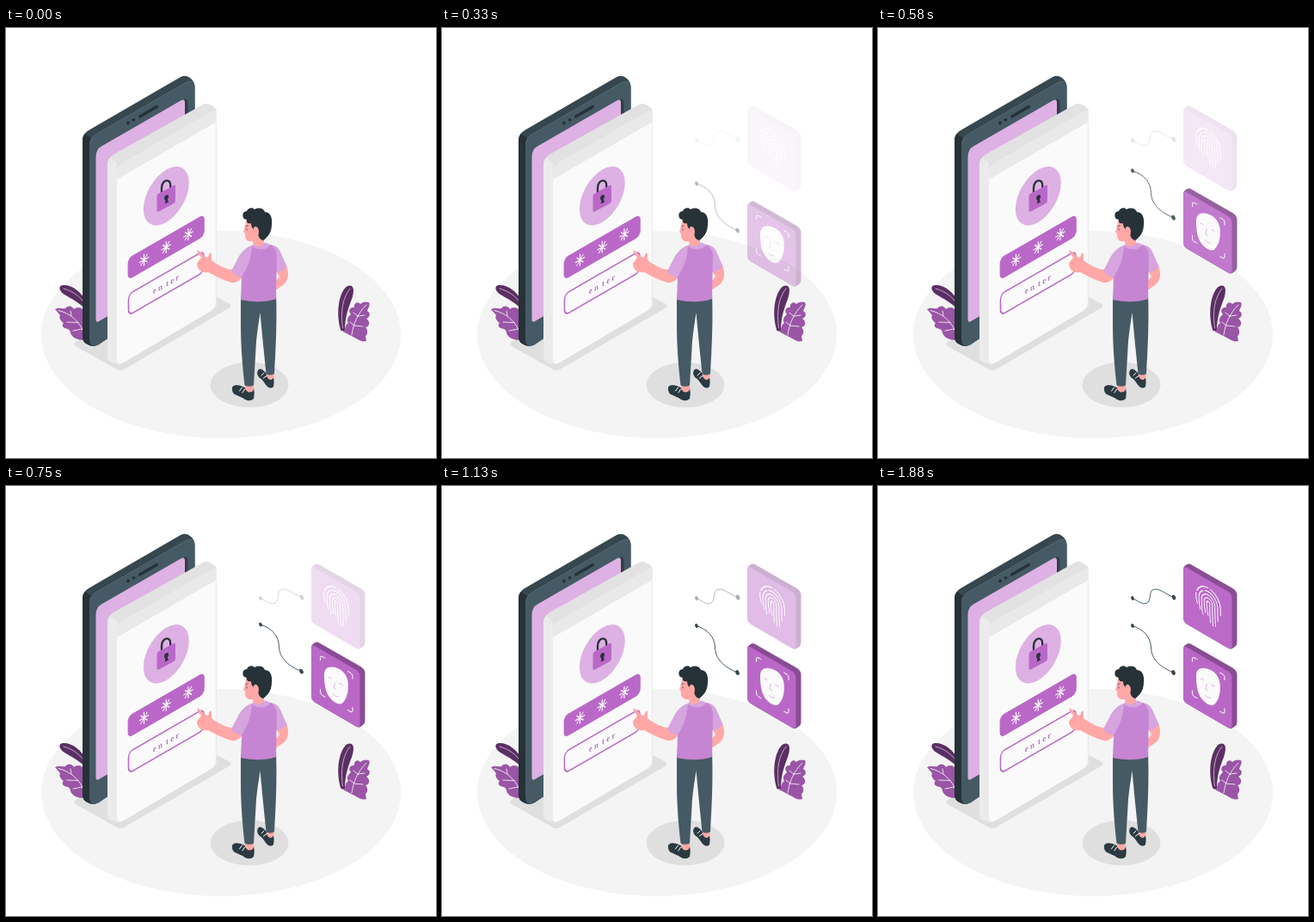
An HTML page that plays this animation: 500x500 px, repeating every 1.93 s.

```html
<!DOCTYPE html>
<html lang="en">
<head>
<meta charset="utf-8">
<title>Secure sign-in</title>
<style>
  html, body { margin: 0; width: 100%; height: 100%; overflow: hidden; background: #fff; }
  svg { display: block; width: 100vw; height: 100vh; }
  .line { fill: none; stroke-linecap: round; stroke-linejoin: round; }
  .white { stroke: #fff; }
  .enter { font: bold 10px "Liberation Serif", "Noto Serif", serif; letter-spacing: 2.6px; fill: #b179bd; }
</style>
</head>
<body>
<svg viewBox="0 0 500 500">
  <defs>
    <g id="card">
      <path fill="#8a4c95" d="M355 97Q355 93.500 358 92L360 90.700Q361.500 90 363.500 91L412.500 119Q417.500 122 417.500 127V182Q417.500 185.500 415 187L411.500 189.300Q409 190 407 188.500L359 160.500Q355 158 355 153Z"/>
      <path fill="#ba68c8" d="M355 98Q355 92.500 359 95L407 122.700Q411.500 125.500 411.500 131V185.500Q411.500 191 407 188.500L359 160.500Q355 158 355 153Z"/>
    </g>
    <g id="star" class="line white" stroke-width="1.300">
      <path d="M0-6.500V6.500M-6 0H6M-4.200-4.400L4.200 4.400M-4.200 4.400L4.200-4.400"/>
    </g>
  </defs>

  <!-- floor and shadows -->
  <ellipse cx="250" cy="356.500" rx="209" ry="120.500" fill="#f4f4f4"/>
  <path fill="#dfdfdf" d="M81 365L106 350L245 313L259 320Q264 323 259 326L138 396.500Q133 399.500 128 396.500L81 370Q78 367.500 81 365Z"/>
  <ellipse cx="283" cy="415" rx="45.500" ry="26.300" fill="#dfdfdf"/>

  <!-- left plant -->
  <path fill="#5b2f63" d="M94 329C86 319 76 315 68 310C62 306 60 300 66 299C76 298 87 306 94 319Z"/>
  <path class="line" stroke="#d9c3dd" stroke-width=".8" d="M67 303C78 306 86 312 92 321"/>
  <path fill="#9a55a6" d="M96 362C88 364 80 362 77 358C74 355 76 352 72 350C66 349 64 346 67 343C64 341 61 337 63 334L57 327C62 324 65 327 69 326C72 322 77 323 79 327C85 322 91 327 96 335Z"/>
  <path class="line white" stroke-width=".8" d="M61 328.500C76 332 86 342 91 355M76 334.500L75 329M84 342.500L71 342M88.500 350L78 352"/>

  <!-- right plant -->
  <path fill="#5b2f63" d="M389.500 352C384 335 386 314 393 304C397 298 404 298 404 305C404 317 394 327 394 353Z"/>
  <path class="line" stroke="#d9c3dd" stroke-width=".8" d="M400 303C391 314 389 330 391.500 349"/>
  <path fill="#9a55a6" d="M392 353C396 350 393 346 398 343C395 338 399 335 401 333C397 328 401 324 405 325C404 320 409 317 412 321C415 318 419 318 422 319C424 322 421 326 420 329C424 331 424 336 419 338C424 341 423 347 418 348C422 352 420 357 418 358L419 364C415 365 412 364 409 362Z"/>
  <path class="line white" stroke-width=".8" d="M419 322C409 332 404 343 402 357M409 335L404 331M409 335L417 334M405 346L400 342M405 346L415 347"/>

  <!-- phone -->
  <path fill="#37474f" d="M89 131Q89 123 96 119L203 57Q209 54 214 58Q219.500 62 219.500 69V290L108 368Q101 372 95 368Q89 365 89 360Z"/>
  <path fill="#263238" d="M89 131Q89 126 91.500 123L99 127.500L104 368.500Q99 370.500 95 368Q89 365 89 360Z"/>
  <path fill="#455a64" d="M97 136Q97 128 104 124L208 64Q219.500 58 219.500 70V294L107 368.500Q97 372 97 362Z"/>
  <path class="line" stroke="#5d717a" stroke-width=".7" d="M97.500 136Q97.500 128 104 124L208 64Q213 61 217 62.500"/>
  <path fill="#2f3f47" d="M205 85L208 82.500Q211.500 82 211.500 88V110H205Z"/>
  <path fill="#ddb1e3" d="M104.500 150Q104.500 141 111 137.500L204 84Q208 82 208 87V283L108 341Q104.500 343 104.500 339Z"/>
  <g fill="#263238"><circle cx="142" cy="110.500" r="1.900"/><circle cx="148.500" cy="106.800" r="1.900"/></g>
  <path class="line" stroke="#263238" stroke-width="3.200" d="M155.500 103L175.500 91.500"/>

  <!-- sign-in panel -->
  <path fill="#e2e2e2" d="M118 159Q118 151 125 147L229 89Q233 87 237 89L242 92Q245 94 245 99V319Q245 325 240 328L136 390Q131 393 126 390L121 388Q118 386 118 381Z"/>
  <path fill="#ebebeb" d="M118 159Q118 154 121 151L128 156Q129 158 129 163V390.500L121 388Q118 386 118 381Z"/>
  <path fill="#fafafa" d="M129 169Q129 161 136 157L238 98Q245 94 245 101V319Q245 325 240 328L136 389.500Q129 393 129 386Z"/>
  <path fill="#e9e9e9" d="M129 176V169Q129 161 136 157L238 98Q245 94 245 101V109Z"/>
  <path class="line" stroke="#eaeaea" stroke-width="1.200" d="M244.400 110V319Q244.400 325 239.500 328"/>

  <g transform="matrix(.866 -.5 0 1 186.300 195.300)"><circle r="30.600" fill="#ddb1e3"/></g>
  <path class="line" stroke="#263238" stroke-width="2.300" d="M181 192V186C181 181 184 177.300 187 177.300C190 177.300 191.200 180 191.200 183V187"/>
  <path fill="#ba68c8" d="M175.500 195.500Q175.500 193.500 177.500 192.500L195 183Q197 182 197 184V201Q197 203 195 204L177.500 213.500Q175.500 214.500 175.500 212.500Z"/>
  <path fill="#263238" d="M184 198C183.800 194.500 188.800 192 189 196C189 198 187.800 199 187.800 199.500L189 202.300L184.600 204.500L185.500 200.800Q184.200 200.300 184 198Z"/>

  <g transform="matrix(.866 -.5 0 1 186.200 254.800)">
    <rect x="-51.500" y="-12.700" width="103" height="25.400" rx="6" fill="#ba68c8"/>
    <use href="#star" x="-29.700"/><use href="#star"/><use href="#star" x="29.700"/>
  </g>
  <g transform="matrix(.866 -.5 0 1 186.200 296.600)">
    <rect x="-50.500" y="-12.200" width="101" height="24.400" rx="6" fill="none" stroke="#ba68c8" stroke-width="1.800"/>
    <text class="enter" text-anchor="middle" x="1" y="4.200">en<tspan dx="2.400">ter</tspan></text>
  </g>

  <!-- person -->
  <g fill="#2b3a41">
    <path d="M292.500 399C294 395 298 396 302 401Q307 404 310 403Q312.500 409 311 417Q308 420 304 417C300 413 299 409 295 407Q291 403 292.500 399Z"/>
    <path d="M263 420C262 416 267 414 273 416Q278 419 283 419L288 418Q289.500 425 288 431Q284 435 278 432C274 429 270 428 266 426Q263 424 263 420Z"/>
  </g>
  <g fill="#ffa8a7">
    <path d="M278 413H288V420Q286 425 281 423L278 420ZM302.500 400H311.500V406Q309 411 305 408L303 405Z"/>
    <path d="M326 276C330 286 328 295 322 299L313 305L312 296L318 289L314 282Z"/>
  </g>
  <path class="line white" stroke-width="1" d="M271.500 422L274.500 418M275 424L277.500 420M297 404L300 401M299.500 407L303 404.500"/>
  <path fill="#455a64" d="M273 312L314 308C315 335 314.500 362 312 402Q307 405 302.500 402L299 368L295.500 331C293 348 291 360 290.500 373L288 415.500Q283 418 277.500 415.500C275 394 273 370 273 345Z"/>

  <path fill="#ffa8a7" d="M222 258.500C226 259 229 263 231 266L235 267C236 262 238 260 239 262.500L239 270C246 276 257 281 263 281L266 275L277 284C275 292 269 297 262 296C252 293 243 288 235 284C228 285 224 282 222.500 277Q221 274 224 271L227 267Q223 262 222 258.500Z"/>
  <path class="line" stroke="#f28f8f" stroke-width=".7" d="M231 266L228 271M224 273L228 274"/>
  <path fill="#d6a4df" d="M288 252C278 255 273 261 269 269L262 283Q268 290 276 290L288 270ZM302 251C313 252 317 255 319 260L326.500 277Q322 284 314 284L306 266Z"/>
  <path fill="#c685d2" d="M287 253C294 257 305 254 308 252Q314 256 315 264L314 315Q296 321 273 316L274 290C279 281 285 272 286 253Z"/>
  <path fill="#d6a4df" d="M286 254Q288 249 293 249L303 250Q307 251 306 254Q297 261 286 254Z"/>
  <path fill="#ffa8a7" d="M280 222C278 227 278 232 276 237L278 239C277.500 245 280 249 287 248L288 252Q294 257 300 250L300 240L298 224Z"/>
  <path fill="#263238" d="M277 222C274 219 275 213 280 213C281 209 287 208 289 211C294 208 300 210 301 214C307 214 310 220 309 228C309 237 305 243 299 247C295 246 293 243 293 236L290 230L289 235C286 233 285 230 285 227C282 228 279 226 280 223Z"/>
  <path fill="#ffa8a7" d="M293.500 240C290 241 286.500 236 288 232C290 229.500 293.500 231.500 294 236Z"/>
  <path class="line" stroke="#263238" stroke-width=".7" d="M279 230.500L281 230M280 233.500V235"/>

  <!-- face recognition -->
  <g id="face">
    <g id="wire2"></g>
    <use href="#card" y="92.500"/>
    <path class="line white" stroke-width="1" d="M365.500 204V201Q365.500 198.500 368 199.800L371 201.500M397.500 217L401 219Q403 220.300 403 222.500V225.500M365.500 238V241Q365.500 243.500 367.500 244.700L371 246.700M397.500 262L401 264Q403 265 403 262.500V259"/>
    <path fill="#fafafa" d="M370 221C370 214 374 211 380 212C389 213 396 219 397.500 229C399 240 396 250 391 254C387 257 380 252 376 247C371 240 370 230 370 221Z"/>
    <path class="line" stroke="#d6a4df" stroke-width=".8" d="M375 224Q377 223 378.500 225.500M387.500 231Q390 230.500 391.500 233.500M382.500 230L381 236L383.500 237.500M380 243.500Q383 247 386.500 246.500"/>
  </g>

  <!-- fingerprint -->
  <g id="print">
    <g id="wire1"></g>
    <use href="#card"/>
    <g id="ridges" class="line white" stroke-width="1.100" transform="matrix(.866 .5 0 1 384 141.500)"></g>
  </g>
</svg>
<script>
  const LOOP = 1930, START = 130, FADE_END = 1900;
  const $ = id => document.getElementById(id);

  function wire(id, d, x1, y1, x2, y2) {
    $(id).innerHTML =
      `<path class="line" stroke="#455a64" stroke-width="1" d="${d}"/>
       <ellipse cx="${x1}" cy="${y1}" rx="1.800" ry="2.500" transform="rotate(-25 ${x1} ${y1})" fill="#37474f"/>
       <ellipse cx="${x2}" cy="${y2}" rx="2.100" ry="3" transform="rotate(-25 ${x2} ${y2})" fill="#37474f"/>`;
  }
  wire('wire1', 'M296 130.500C303 134 307 138 312 136.500C318 134 315 124 319 121C326 117 334 126 344 129.500', 296, 130.500, 344, 129.500);
  wire('wire2', 'M296 162.500C309 167 317 175 317.500 188C318 201 327 210 343.500 217', 296, 162.500, 343.500, 217);

  // nested arches: radius, left foot, right foot, dash pattern
  const arches = [
    [2, 9, 16, ''], [5.500, 8, 18, ''], [9, 11, 17, ''],
    [12.600, 7, 14, '25 3 40'], [16.500, 2, 7, '12 3 19 3 30']
  ];
  $('ridges').innerHTML = arches.map(([r, a, b, dash]) => {
    const y = -5 - r * .08;
    return `<path stroke-dasharray="${dash}" d="M${2 - r} ${a}Q${-r} ${a - 5} ${-r} ${y}A${r} ${r} 0 0 1 ${r} ${y}Q${r} ${b - 6} ${r + 1} ${b}"/>`;
  }).join('');

  function bezier(x1, y1, x2, y2) {
    const at = (a, b, s) => 3 * (1 - s) ** 2 * s * a + 3 * (1 - s) * s * s * b + s ** 3;
    return x => {
      let lo = 0, hi = 1;
      for (let i = 0; i < 24; i++) {
        const mid = (lo + hi) / 2;
        if (at(x1, x2, mid) < x) lo = mid; else hi = mid;
      }
      return at(y1, y2, (lo + hi) / 2);
    };
  }
  const overshoot = bezier(.36, -.01, .5, 1.38);

  function draw(t) {
    const shown = t >= START;
    const p = overshoot(Math.min(1, t / 1000));
    $('face').setAttribute('transform', `translate(0 ${30 * (1 - p)})`);
    $('face').setAttribute('opacity', shown ? Math.min(1, p) : 0);
    $('print').setAttribute('opacity', shown ? Math.min(1, (t / FADE_END) ** 1.6) : 0);
  }

  const born = performance.now();
  function tick() {
    draw((performance.now() - born) % LOOP);
    requestAnimationFrame(tick);
  }
  tick();
</script>
</body>
</html>
```
